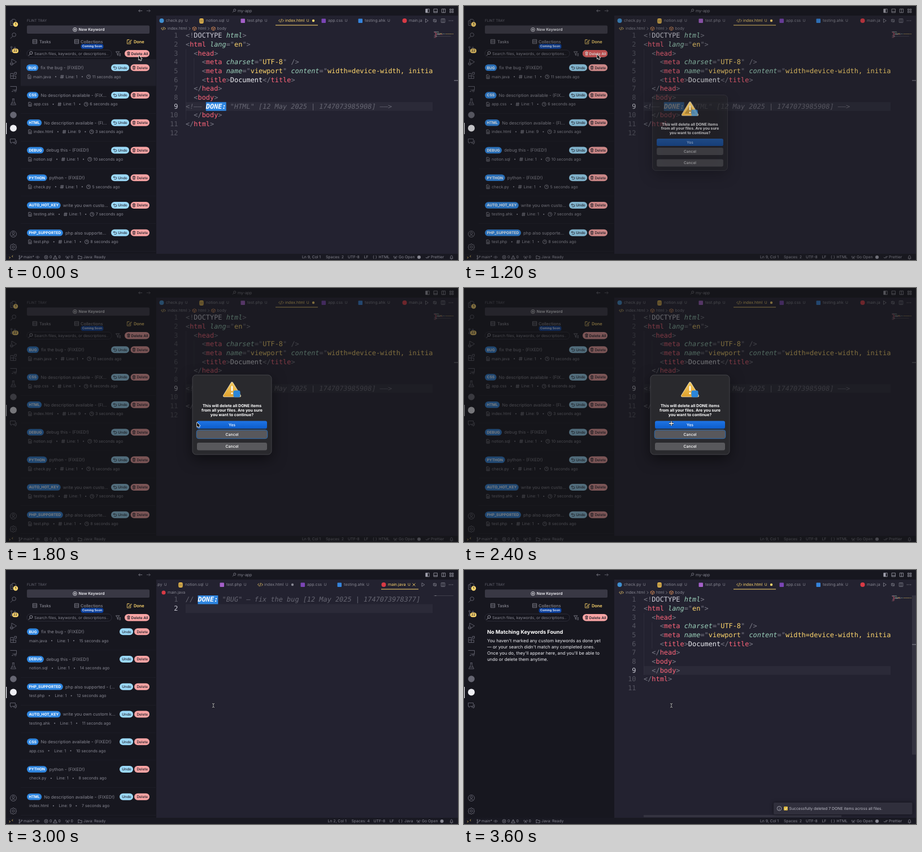
Write an HTML page with a canvas that moves like this. It is 800 by 450 pixels and loops after 3.7 s.

```html
<!DOCTYPE html>
<html lang="en">
<head>
<meta charset="utf-8">
<title>Delete all done items</title>
<style>
html, body { margin: 0; width: 100%; height: 100%; overflow: hidden; background: #17171f; }
canvas { display: block; width: 800px; height: 450px; }
</style>
</head>
<body>
<canvas id="stage" width="800" height="450"></canvas>
<script>
const ctx = document.getElementById('stage').getContext('2d');
ctx.textBaseline = 'middle';
ctx.textRendering = 'geometricPrecision';

const LOOP = 3700, STEP = 100;
const SANS = 'Inter, sans-serif', MONO = '"DejaVu Sans Mono", monospace';
const C = {
  side: '#17171f', edit: '#232230', line: '#2b2a38', text: '#b9b9c4', dim: '#878792', faint: '#666672',
  white: '#efeff4', yellow: '#ffd76d', pink: '#ff657a', cyan: '#9cd1bb', blue: '#2f86e0',
  undo: '#9bd9f8', del: '#f9a4a4', ink: '#20202a'
};
const ICON = {
  copy: 'M-2-5.5h4.5l2 2v6.5h-6.5zM-2-3h-3v8.5h6.5v-2.5',
  search: 'M4.5-1.5a3.3 3.3 0 1 1-6.6 0a3.3 3.3 0 1 1 6.6 0M-1 1l-4 4',
  branch: 'M-2-3a1.3 1.3 0 1 1-2.6 0a1.3 1.3 0 1 1 2.6 0M-3.3-1.7v4M-2 4a1.3 1.3 0 1 1-2.6 0a1.3 1.3 0 1 1 2.6 0M4-2a1.3 1.3 0 1 1-2.6 0a1.3 1.3 0 1 1 2.6 0M2.7-.7q0 2.5-6 2.5',
  debug: 'M-3-5.5l8.5 5l-6 4M-3-5.5v5M-5 2a2 2 0 1 1 4 0v1.5a2 2 0 1 1-4 0zM-6 3h6',
  blocks: 'M-5-3.5h5v4.5h4.5v4.5h-9.5zM0 1h-5M0 1v4.5M2-5.5h3.5v3.5h-3.5z',
  screen: 'M-5.5-4h11v6.5h-7M-3 5h3M5 4a1.5 1.5 0 1 1-3 0a1.5 1.5 0 1 1 3 0',
  beaker: 'M-2-5.5h4M-1.2-5.5v4l-3.3 6.5h9l-3.3-6.5v-4M-3 2h6',
  chat: 'M-5.5-4.5h9v6h-5.5l-2 2v-2h-1.5zM0 3h2l2 2v-2h1.5v-5',
  user: 'M5.5 0a5.5 5.5 0 1 1-11 0a5.5 5.5 0 1 1 11 0M2-1.5a2 2 0 1 1-4 0a2 2 0 1 1 4 0M-3.7 4q3.7-4.5 7.4 0',
  gear: 'M2 0a2 2 0 1 1-4 0a2 2 0 1 1 4 0M-1-5.5h2l.6 1.8l2-.9l1.3 1.3l-.9 2l1.5.6v1.7l-1.6.6l.9 2l-1.3 1.3l-2-.9l-.6 1.5h-2l-.6-1.5l-2 .9l-1.3-1.3l.9-2l-1.5-.6v-1.7l1.5-.6l-.9-2l1.3-1.3l2 .9z',
  file: 'M-3-4h4l2 2v6h-6zM-1.5 0h3M-1.5 2h3',
  clock: 'M4 0a4 4 0 1 1-8 0a4 4 0 1 1 8 0M0-2.5v2.5h2',
  hash: 'M-1-4l-1 8M2-4l-1 8M-3.5-1.5h7.5M-4 1.5h7.5',
  trash: 'M-3.5-2.5h7M-1.5-2.5v-1.5h3v1.5M-2.5-2.5l.4 6.5h4.2l.4-6.5M-.7-.5v3M.7-.5v3',
  undo: 'M-1-4l-2.5 2.5l2.5 2.5M-3.5-1.5h5a2.5 2.5 0 0 1 0 5h-3.5',
  plus: 'M4 0a4 4 0 1 1-8 0a4 4 0 1 1 8 0M0-2.5v5M-2.5 0h5',
  list: 'M-4-4h8v8h-8zM-4-1.3h8M-4 1.3h8',
  note: 'M1-3.5h-5v8h7v-4M-2-4.5v2M-1 1.5l5-5l1 1l-5 5h-1z',
  filter: 'M-4.5-4h7l-2.7 3.5v4l-1.5-1.3v-2.7zM2 0h3M2 2h3M2 4h3',
  left: 'M4 0h-8M-1-3l-3 3l3 3',
  right: 'M-4 0h8M1-3l3 3l-3 3',
  box: 'M0-4l4 2v4l-4 2l-4-2v-4zM-4-2l4 2l4-2M0 0v4',
  angle: 'M-1.5-3l3 3l-3 3',
  code: 'M-2.5-3l-3 3l3 3M2.5-3l3 3l-3 3M1.2-4l-2.4 8',
  play: 'M-2.5-4l6 4l-6 4z',
  split: 'M-4-4h8v8h-8zM0-4v8',
  bottom: 'M-4-4h8v8h-8zM-4 1.5h8',
  grid: 'M-4-4h3v3h-3zM1-4h3v3h-3zM1 1h3v3h-3zM-4 1h3v3h-3z',
  diff: 'M-3-3v5h4M3 3v-5h-4M0-4l-2 2l2 2M0 4l2-2l-2-2',
  close: 'M-3-3l6 6M3-3l-6 6',
  cross: 'M4 0a4 4 0 1 1-8 0a4 4 0 1 1 8 0M-1.5-1.5l3 3M1.5-1.5l-3 3',
  warn: 'M0-4l4.5 8h-9zM0-1v2.5',
  info: 'M4 0a4 4 0 1 1-8 0a4 4 0 1 1 8 0M0-.5v2.8M0-2.3v.6',
  eye: 'M-4.5 0q4.5-5 9 0q-4.5 5-9 0M1 0a1 1 0 1 1-2 0a1 1 0 1 1 2 0',
  tower: 'M0-1l-2 5M0-1l2 5M-3-3q-1.5 2 0 4M3-3q1.5 2 0 4M0-2v1',
  cup: 'M-4 1v-4h3l1 1.5h4v5h-5M-4 2l2 1l-2 1z',
  bell: 'M-3 2.5q1.2-1 1-4q2-4 4 0q-.2 3 1 4zM-1 4h2',
  checks: 'M-5 0l2 2.5l4-5M-.5 2.5l4-5',
  check: 'M-4 0l3 3l5-6',
  remote: 'M-4-1l2 2l-2 2M4-4l-2 2l2 2'
};

const rows = [
  ['BUG', 'fix the bug - (FIXED!)', 'main.java', 1, 11],
  ['CSS', 'No description available - (FIX...', 'app.css', 1, 6],
  ['HTML', 'No description available - (FI...', 'index.html', 9, 3],
  ['DEBUG', 'debug this - (FIXED!)', 'notion.sql', 1, 10],
  ['PYTHON', 'python - (FIXED!)', 'check.py', 1, 5],
  ['AUTO_HOT_KEY', 'write you own custo...', 'testing.ahk', 1, 7],
  ['PHP_SUPPORTED', 'php also supporte...', 'test.php', 1, 8]
];
const reloadedRows = [
  ['BUG', 'fix the bug - (FIXED!)', 'main.java', 1, 15],
  ['DEBUG', 'debug this - (FIXED!)', 'notion.sql', 1, 14],
  ['PHP_SUPPORTED', 'php also supported - (...', 'test.php', 1, 12],
  ['AUTO_HOT_KEY', 'write you own custom k...', 'testing.ahk', 1, 11],
  ['CSS', 'No description available - (FIXED!)', 'app.css', 1, 10],
  ['PYTHON', 'python - (FIXED!)', 'check.py', 1, 8],
  ['HTML', 'No description available - (FIXED!)', 'index.html', 9, 7]
];
const doneComment = '<!—— DONE: "HTML" [12 May 2025 | 1747073985908] ——>';
const page = ['<!DOCTYPE html>', '<html lang="en">', '  <head>', '    <meta charset="UTF-8" />',
  '    <meta name="viewport" content="width=device-width, initial-scale=1.0" />',
  '    <title>Document</title>', '  </head>', '  <body>', doneComment, '  </body>', '</html>', ''];
const cleanPage = page.filter(l => l !== doneComment);
const javaPage = ['// DONE: "BUG" — fix the bug [12 May 2025 | 1747073978377]', ''];

function rect(x, y, w, h, fill, r = 0, stroke) {
  ctx.beginPath();
  ctx.roundRect(x, y, w, h, r);
  if (fill) { ctx.fillStyle = fill; ctx.fill(); }
  if (stroke) { ctx.strokeStyle = stroke; ctx.lineWidth = .8; ctx.stroke(); }
}
function dot(x, y, r, fill) { rect(x - r, y - r, 2 * r, 2 * r, fill, r); }
function text(s, x, y, size, fill, weight = 400, align = 'left') {
  ctx.font = `${weight} ${size}px ${SANS}`;
  ctx.textAlign = align;
  ctx.fillStyle = fill;
  ctx.fillText(s, x, y);
  return x + ctx.measureText(s).width;
}
function icon(name, x, y, color = C.dim, scale = .8, width = .8) {
  ctx.save();
  ctx.translate(x, y);
  ctx.scale(scale, scale);
  ctx.strokeStyle = color;
  ctx.lineWidth = width / scale;
  ctx.stroke(new Path2D(ICON[name]));
  ctx.restore();
}
// Piecewise linear value from [time, value] pairs
function track(t, keys) {
  if (t <= keys[0][0]) return keys[0][1];
  for (let i = 1; i < keys.length; i++) {
    const [a, from] = keys[i - 1], [b, to] = keys[i];
    if (t <= b) return from + (to - from) * (t - a) / (b - a);
  }
  return keys.at(-1)[1];
}

function frameBars() {
  rect(0, 0, 800, 450, C.side);
  rect(266, 17, 534, 422, C.edit);
  icon('left', 238, 8.5); icon('right', 252, 8.5, C.faint);
  icon('search', 404, 8.3, C.dim, .6);
  text('my-app', 410, 8.5, 7, C.dim);
  ['split', 'bottom', 'split', 'grid'].forEach((n, i) => icon(n, 746 + i * 14.2, 8.5, '#a2a2ae'));
  rect(742.8, 5.3, 3.2, 6.4, '#a2a2ae');

  ['copy', 'search', 'branch', 'debug', 'blocks', 'screen', 'beaker'].forEach((n, i) =>
    icon(n, 13, 29 + i * 23.5, C.faint, 1, .9));
  dot(13, 193, 5.8, C.faint);
  dot(13, 216.5, 6, C.white);
  rect(0, 207, 1.2, 20, C.white);
  icon('chat', 13, 240, C.faint, 1, .9);
  icon('user', 13, 404, C.faint, 1, .9);
  icon('gear', 13, 427, C.faint, 1, .9);
  dot(17, 32.5, 4.2, C.yellow);
  text('1', 17, 32.8, 5.5, C.ink, 600, 'center');
  rect(11, 75.5, 11, 8, C.yellow, 4);
  text('22', 16.5, 79.8, 5.5, C.ink, 600, 'center');
}

function sidebarHead(hover) {
  text('FLINT TRAY', 37, 25.8, 6.2, C.faint);
  rect(37, 34.5, 217, 14.5, '#393844', 2);
  icon('plus', 122, 41.8, C.white, .85);
  text('New Keyword', 128.5, 42.2, 6.9, C.white, 600);
  icon('list', 51, 63, C.dim, .9);
  text('Tasks', 59, 63.5, 7.4, C.dim, 500);
  icon('list', 125, 63, C.dim, .9);
  text('Collections', 132, 63.5, 7.4, C.dim, 500);
  icon('note', 218, 63, C.yellow, .9);
  text('Done', 226, 63.5, 7.4, C.yellow, 600);
  rect(132.5, 67.3, 40, 8.8, '#0c419f', 4);
  text('Coming Soon', 152.5, 71.8, 5.4, '#fff', 600, 'center');
  rect(37, 78, 150, 12.5, '#15151d', 6, '#33333f');
  icon('search', 43.5, 84.3, C.text, .75);
  text('Search files, keywords, or descriptions..', 50, 84.5, 6.95, C.dim);
  icon('filter', 198.5, 84.5, C.dim, .9);
  const ink = hover > .5 ? '#fff' : C.ink;
  rect(210, 78, 44, 12.5, C.del, 6.2);
  ctx.globalAlpha = hover;
  rect(210, 78, 44, 12.5, '#e35c5c', 6.2);
  ctx.globalAlpha = 1;
  icon('trash', 217, 84.2, ink, .75);
  text('Delete All', 221.5, 84.6, 6.5, ink, 600);
}

function row([badge, desc, file, line, secs], y, icons, hover) {
  if (hover) {
    ctx.globalAlpha = hover;
    rect(26, y - 15, 239.5, 47, '#20202a');
    ctx.globalAlpha = 1;
  }
  rect(26, y + 32.3, 239, .7, '#1f1f29');
  const left = 37 - hover;
  ctx.font = `700 6.6px ${SANS}`;
  const width = ctx.measureText(badge).width + 7;
  rect(left, y - 5.8, width, 11.6, C.blue, 5.8);
  text(badge, left + 3.5, y + .4, 6.6, '#fff', 700);
  text(desc, left + width + 4, y + .4, 7.7, C.dim);

  const undoX = icons ? 186 : 201, delX = icons ? 220.5 : 227, undoW = icons ? 32 : 24;
  rect(undoX, y - 6, undoW, 12, C.undo, 6);
  rect(delX, y - 6, 254 - delX, 12, C.del, 6);
  if (icons) {
    icon('undo', undoX + 6.8, y, C.ink, .75);
    icon('trash', delX + 6, y, C.ink, .75);
  }
  text('Undo', undoX + undoW - 3.3, y + .4, 6.4, C.ink, 500, 'right');
  text('Delete', 251, y + .4, 6.4, C.ink, 500, 'right');

  const my = y + 16, gap = icons ? 26 : 18;
  let x = left + (icons ? 12 : 4);
  [['file', file], ['hash', 'Line: ' + line], ['clock', secs + ' seconds ago']].forEach(([name, label], i) => {
    if (i) { dot(x + 8.3, my, 1, C.dim); x += gap; }
    if (icons) icon(name, x - 6.5, my, C.dim, .85);
    x = text(label, x, my + .3, 7.1, C.dim);
  });
}

function emptyList() {
  text('No Matching Keywords Found', 41, 110.6, 9.2, '#fff', 700);
  ["You haven't marked any custom keywords as done yet", "— or your search didn't match any completed ones.",
    "Once you do, they'll appear here, and you'll be able to", 'undo or delete them anytime.']
    .forEach((s, i) => text(s, 41, 125.5 + i * 10.9, 7.8, C.white));
}

function tabs(java) {
  const list = [['check.py', 283, '#3f8fd0'], ['notion.sql', 354, '#f2c14e'], ['test.php', 427, '#a460c8'],
    ['index.html', 494, C.yellow], ['app.css', 570, '#7b45b5'], ['testing.ahk', 635, '#3584dc'], ['main.java', 713, '#d83a45']];
  const shift = java ? -37 : 0;
  ctx.save();
  ctx.beginPath();
  ctx.rect(266, 17, java ? 466 : 471, 19);
  ctx.clip();
  for (const [name, x0, color] of list) {
    const x = x0 + shift, active = name === (java ? 'main.java' : 'index.html');
    const ink = active ? C.yellow : C.dim;
    if (name === 'index.html') icon('code', x - 7, 26, C.yellow, .8);
    else if (name === 'notion.sql') {
      rect(x - 12, 22, 8, 9, color, 3);
      rect(x - 12, 24.7, 8, .7, C.edit);
      rect(x - 12, 27.7, 8, .7, C.edit);
    } else if (/py|java/.test(name)) dot(x - 7.5, 26, 4, color);
    else rect(x - 11.5, 22.5, 7.5, 7.5, color, 1);
    const end = text(name, x, 26, 7.05, ink);
    text('U', end + 3.5, 26, 6.5, ink);
    if (name === 'index.html') dot(x + 50, 26, 2.2, ink);
    if (active) rect(x - (java ? 12 : 17), 33.6, java ? 66 : 75, 1, C.yellow);
  }
  ctx.restore();
  if (java) icon('close', 722, 26, C.yellow, .8);
  icon('play', java ? 738 : 744.5, 26, C.dim, .8);
  icon('diff', 759, 26, C.dim, .85);
  icon('split', 773.5, 26, C.dim, .8);
  [784.5, 787.5, 790.5].forEach(x => dot(x, 26, .7, C.dim));
  if (java) {
    dot(279, 40, 3.5, '#d83a45');
    text('main.java', 286, 40.3, 7, C.dim);
  } else {
    icon('code', 278.5, 40, C.yellow, .7);
    text('index.html', 286, 40.3, 7, C.dim);
    icon('angle', 325, 40, C.dim, .8);
    icon('box', 333.5, 40, '#e0915a', .8);
    text('html', 340, 40.3, 7, C.dim);
    icon('angle', 358.5, 40, C.dim, .8);
    icon('box', 367, 40, '#e0915a', .8);
    text('body', 373.5, 40.3, 7, C.dim);
  }
}

// Returns [text, colour, font style] pieces of a line
function tokens(line) {
  const note = line.match(/^(<!—— |\/\/ )(DONE:)(.*)$/);
  if (note) return [[note[1], C.faint, 'italic'], [note[2], '#ffffff', 'italic bold'], [note[3], C.faint, 'italic']];
  let opened = false, inTag = false, quoted = false;
  return (line.match(/<[!\/]?|\/?>|"|=|\s+|[^\s<>"=\/]+/g) || []).map(s => {
    let color = '#7c7c88', style = '';
    if (s === '"') quoted = !quoted;
    else if (quoted) color = C.yellow;
    else if (s[0] === '<') opened = inTag = true;
    else if (s.endsWith('>')) inTag = false;
    else if (s !== '=' && s.trim()) {
      if (opened) { color = s === 'DOCTYPE' ? '#cfcfda' : C.pink; opened = false; }
      else if (inTag) { color = C.cyan; style = 'italic'; }
      else color = C.white;
    }
    return [s, color, style];
  });
}

function editor(lines, current) {
  const cw = 7.17, lineY = i => 52.7 + i * 15.66;
  rect(318, lineY(current - 1) - 7.8, 437, 15.6, C.line);
  if (lines.length > 2) {
    rect(318, 76.5, .7, (lines.length - 4) * 15.66, '#343341');
    rect(332.5, 92.2, .7, 47, '#343341');
  }
  ctx.save();
  ctx.beginPath();
  ctx.rect(266, 44, 526, 390);
  ctx.clip();
  lines.forEach((line, i) => {
    const y = lineY(i), textY = y + .6;
    ctx.font = `11.9px ${MONO}`;
    ctx.textAlign = 'right';
    ctx.fillStyle = i + 1 === current ? '#c8c8d2' : '#565662';
    ctx.fillText(i + 1, 304.5, textY);
    ctx.textAlign = 'left';
    let col = 0;
    for (const [s, color, style] of tokens(line)) {
      if (s.trim()) rect(757 + col * .6, 45 + i * 1.05, s.length * .6, .7, color + '99');
      ctx.save();
      ctx.beginPath();
      ctx.rect(266, 44, 489, 390);
      ctx.clip();
      const x = 318 + col * cw;
      if (s === 'DONE:') rect(x, y - 7.8, cw * 5, 15.6, C.blue);
      ctx.font = `${style} 11.9px ${MONO}`;
      ctx.fillStyle = color;
      ctx.fillText(s, x, textY);
      ctx.restore();
      col += s.length;
    }
  });
  ctx.restore();
}

function statusBar(java) {
  const y = 445, say = (s, x) => text(s, x, y + .2, 6.8, C.dim);
  rect(0, 439, 800, 11, '#191922');
  icon('remote', 9, y, C.yellow, .8);
  icon('branch', 26, y, C.dim, .7); say('main*', 31);
  icon('eye', 56, y, C.faint, .75);
  icon('cross', 71, y, C.dim, .75); say('0', 77);
  icon('warn', 87, y, C.dim, .75); say('0', 92.5);
  icon('tower', 109, y, C.dim, .8); say('0', 114.5);
  icon('cup', 131, y, C.dim, .8); say('Java: Ready', 137);
  const d = java ? 45.5 : 0;
  say(java ? 'Ln 2, Col 1' : 'Ln 9, Col 1', 524 + d);
  say(java ? 'Spaces: 4' : 'Spaces: 2', 566 + d);
  say('UTF-8', 605 + d);
  say('LF', 633.5 + d);
  say('{ }', 649 + d);
  say(java ? 'Java' : 'HTML', 659.5 + d);
  const live = java ? 736 : 695;
  icon('tower', live - 6, y, C.dim, .75);
  say('Go Open', live);
  dot(java ? 771.5 : 731, y, 3, C.dim);
  if (!java) { icon('checks', 747, y, C.dim, .8); say('Prettier', 752); }
  icon('bell', 788.5, y, C.dim, .85);
}

function dialog(alpha, scale, focused, pressed) {
  ctx.save();
  ctx.translate(400, 224.6);
  ctx.scale(scale, scale);
  ctx.translate(-400, -225);
  ctx.globalAlpha = alpha;
  ctx.shadowColor = 'rgba(0,0,0,.5)';
  ctx.shadowBlur = 24;
  ctx.shadowOffsetY = 8;
  rect(330, 154.5, 140, 141, '#29292d', 6.5);
  ctx.shadowColor = 'transparent';
  rect(330, 154.5, 140, 141, null, 6.5, '#4c4c51');
  ctx.globalAlpha = Math.min(1, alpha * 1.4);
  const gold = ctx.createLinearGradient(0, 166, 0, 194);
  gold.addColorStop(0, '#f3cc62');
  gold.addColorStop(1, '#dfa02c');
  ctx.lineJoin = 'round';
  const triangle = new Path2D('M400 169L413.8 191.5H386.2z');
  for (const [width, color] of [[4.4, '#e9e0c8'], [2.8, gold]]) {
    ctx.lineWidth = width;
    ctx.strokeStyle = color;
    ctx.stroke(triangle);
  }
  ctx.fillStyle = gold;
  ctx.fill(triangle);
  rect(398.7, 174, 2.6, 9, '#fff', 1.3);
  dot(400, 187, 1.6, '#fff');
  rect(402.5, 181.8, 12, 12, '#2b86d9', 3);
  ['This will delete all DONE items', 'from all your files. Are you sure', 'you want to continue?'].forEach((s, i) =>
    text(s, 400, 209.4 + i * 7.8, 7.1, '#fff', 700, 'center'));
  ctx.globalAlpha = alpha;
  const blue = ctx.createLinearGradient(0, 236, 0, 250);
  blue.addColorStop(0, '#1f74e4');
  blue.addColorStop(1, '#0c5cc9');
  rect(338, 236, 124, 13.7, pressed ? '#68686e' : blue, 3);
  rect(338, 252.7, 124, 13.7, '#58585c', 3);
  rect(338, 274.3, 124, 13.7, '#58585c', 3);
  if (focused) rect(337.3, 252, 125.4, 15.1, null, 3.6, '#3b8be0');
  [['Yes', 243], ['Cancel', 259.7], ['Cancel', 281.2]].forEach(([s, y]) =>
    text(s, 400, y + .3, 7, '#fff', 500, 'center'));
  ctx.restore();
}

function notification(alpha, y) {
  ctx.save();
  ctx.globalAlpha = alpha;
  ctx.shadowColor = 'rgba(0,0,0,.5)';
  ctx.shadowBlur = 6;
  rect(548, y, 245.5, 21, '#302f3c', 2);
  ctx.shadowColor = 'transparent';
  icon('info', 558, y + 10.5, C.text, .95);
  rect(566, y + 7, 7, 7, '#d9b53f', 1.2);
  icon('check', 569.5, y + 10.5, '#fff', .55);
  text('Successfully deleted 7 DONE items across all files.', 575.5, y + 10.8, 6.9, C.text);
  ctx.restore();
}

function pointer(t) {
  const x = track(t, [[0, 235], [300, 236], [1400, 235.5], [1800, 338], [2300, 367]]);
  const y = track(t, [[0, 88], [300, 86], [1400, 86], [1800, 238.5], [2300, 240]]);
  ctx.save();
  ctx.translate(x, y);
  ctx.lineJoin = 'round';
  if (t < 2300) {
    const arrow = new Path2D('M0 0v7.5l1.8-1.6l1.3 2.9l1.5-.7l-1.3-2.7h2.4z');
    ctx.strokeStyle = '#fff';
    ctx.lineWidth = 1.4;
    ctx.stroke(arrow);
    ctx.fillStyle = '#111';
    ctx.fill(arrow);
  } else {
    const cross = t < 2800;
    const shape = new Path2D(cross ? 'M-4 0h8M0-4v8' : 'M-2-3.5q2 0 2 1.5q0-1.5 2-1.5M0-2v4M-2 3.5q2 0 2-1.5q0 1.5 2 1.5');
    ctx.strokeStyle = '#111';
    ctx.lineWidth = cross ? 3 : 2.2;
    ctx.stroke(shape);
    ctx.strokeStyle = cross ? '#fff' : '#b4b4bc';
    ctx.lineWidth = cross ? 1.3 : 1;
    ctx.stroke(shape);
  }
  ctx.restore();
}

function draw(t) {
  const java = t >= 3000 && t < 3200, cleared = t >= 3200, cleaned = t >= 3400;
  frameBars();
  sidebarHead(t < 1600 ? track(t, [[500, 0], [800, 1]]) : 0);
  if (cleared) emptyList();
  else (java ? reloadedRows : rows).forEach((r, i) =>
    row(r, 109.3 + i * 48.75, !java, i ? 0 : track(t, [[0, 1], [300, 0]])));
  tabs(java);
  editor(java ? javaPage : cleaned ? cleanPage : page, java ? 2 : 9);
  if (cleaned) {
    rect(793, 45, 7, 282, '#343340');
    rect(318, 434, 350, 4, '#343340');
  }
  if (!java) rect(793, 131.5, 7, 1, '#8a8a96');
  statusBar(java);

  const shade = track(t, [[1000, 0], [1400, .4], [1800, .55], [2400, .55], [2700, .3], [2900, 0]]);
  if (shade) rect(0, 0, 800, 450, `rgba(20,20,22,${shade})`);
  const shown = track(t, [[1100, 0], [1300, 1], [2500, 1], [2700, .6], [2800, 0]]);
  if (shown) dialog(shown, track(t, [[1100, .9], [1300, 1], [2500, 1], [2700, .957], [2800, .935]]), t >= 1600, t >= 2500);
  const notice = track(t, [[3300, 0], [3600, 1]]);
  if (notice) notification(notice, 412 + 8 * (1 - notice));
  pointer(t);
}

function tick() {
  draw(Math.floor(performance.now() % LOOP / STEP) * STEP);
  requestAnimationFrame(tick);
}
tick();
</script>
</body>
</html>
```
